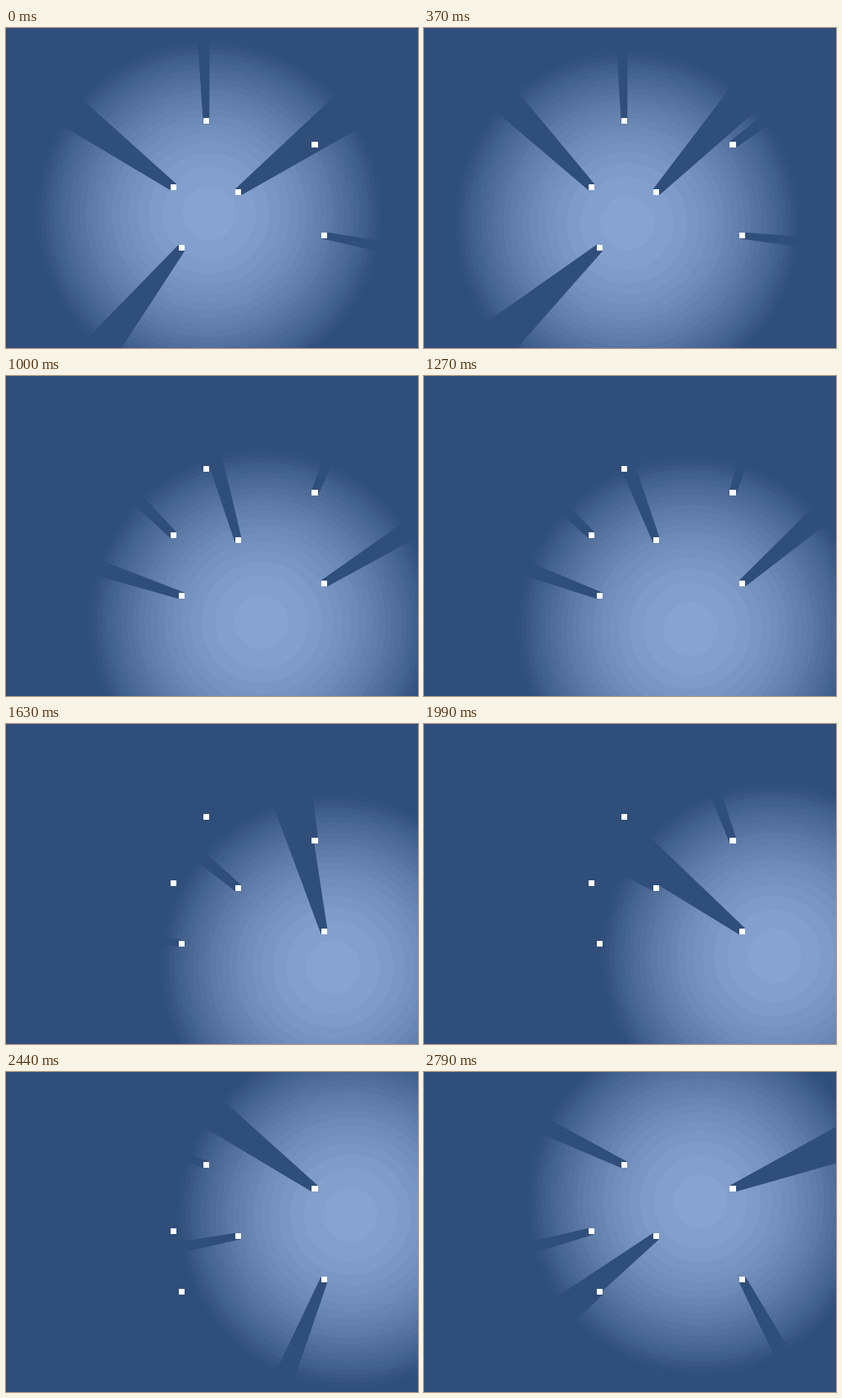
These frames come from a looping animation (503 by 391 pixels, 2890 ms). An HTML page with a canvas:

```html
<!DOCTYPE html>
<html>
<head>
<meta charset="utf-8">
<style>
  html, body { margin: 0; width: 100%; height: 100%; overflow: hidden; background: #304e7a; }
  canvas { display: block; }
</style>
</head>
<body>
<canvas id="stage" width="503" height="391"></canvas>
<script>
const ctx = document.getElementById('stage').getContext('2d');
const LOOP = 2890, STEP = 90, LAST = 31;
const RADIUS = 211, LEVELS = 20.5, HALF = 3.75;
const DARK = [48, 78, 122], BRIGHT = [135, 163, 209];

// Centres of the blocks.
const blocks = [
  [244.5, 113.5], [377, 142.5], [204.5, 194.5],
  [283.5, 200.5], [388.5, 253.5], [214.5, 268.5]
];

// Turning points of the light: step, x, y.
const path = [
  [0, 248, 226.5], [4, 248, 238.5], [8, 280.5, 277.5], [12, 321, 307], [14, 325, 309],
  [19, 415, 294], [22, 427.5, 283.5], [27, 420.5, 174.5], [31, 337.5, 158.5]
];
const rests = [1, 3, 13];

function stepAt(t) {
  const step = Math.min(LAST, Math.floor(t / STEP));
  return rests.includes(step) ? step - 1 : step;
}

function slope(i, axis) {
  const a = path[Math.max(0, i - 1)], b = path[Math.min(path.length - 1, i + 1)];
  return (b[axis] - a[axis]) / (b[0] - a[0]);
}

// Smooth curve through the turning points.
function lightAt(step) {
  let i = 0;
  while (i < path.length - 2 && step >= path[i + 1][0]) i++;
  const a = path[i], b = path[i + 1], span = b[0] - a[0], u = (step - a[0]) / span;
  const ease = u * u * (3 - 2 * u);
  return [1, 2].map(k => a[k] + (b[k] - a[k]) * ease
    + span * u * (1 - u) * ((1 - u) * slope(i, k) - u * slope(i + 1, k)));
}

function mix(f) {
  return `rgb(${DARK.map((d, i) => Math.round(d + (BRIGHT[i] - d) * f))})`;
}

// Brightness falls with the squared distance, in equal levels.
function drawGlow(x, y) {
  for (let n = Math.floor(LEVELS); n >= 0; n--) {
    ctx.fillStyle = mix(1 - n / LEVELS);
    ctx.beginPath();
    ctx.arc(x, y, RADIUS * Math.sqrt((n + 0.5) / LEVELS), 0, 2 * Math.PI);
    ctx.fill();
  }
}

function drawShadow(x, y, [bx, by]) {
  const dx = bx - x, dy = by - y;
  // Of the two diagonals, the one lying across the ray is the silhouette.
  const side = dx * dy > 0 ? -HALF : HALF;
  const near = [[bx - HALF, by - side], [bx + HALF, by + side]]
    .map(([cx, cy]) => [cx, cy]);
  // A ray close to an axis sees the whole facing side instead.
  if (Math.abs(dx) < HALF) near.forEach(p => p[1] = by - Math.sign(dy) * HALF);
  if (Math.abs(dy) < HALF) near.forEach((p, i) => {
    p[0] = bx - Math.sign(dx) * HALF;
    p[1] = by + (i ? HALF : -HALF);
  });
  const far = near.map(([cx, cy]) => [cx + (cx - x) * 60, cy + (cy - y) * 60]);
  ctx.beginPath();
  [near[0], far[0], far[1], near[1]].forEach(p => ctx.lineTo(...p));
  ctx.fill();
}

function drawBlock([bx, by]) {
  const [left, top, right, bottom] =
    [bx - HALF, by - HALF, bx + HALF, by + HALF].map(Math.round);
  ctx.fillRect(left, top, right - left, bottom - top);
}

function draw(t) {
  const [x, y] = lightAt(stepAt(t));
  ctx.fillStyle = mix(0);
  ctx.fillRect(0, 0, 503, 391);
  drawGlow(x, y);
  ctx.fillStyle = mix(0);
  blocks.forEach(b => drawShadow(x, y, b));
  ctx.fillStyle = '#fff';
  blocks.forEach(drawBlock);
}

const start = performance.now();
function tick() {
  draw((performance.now() - start) % LOOP);
  requestAnimationFrame(tick);
}
tick();
</script>
</body>
</html>
```
